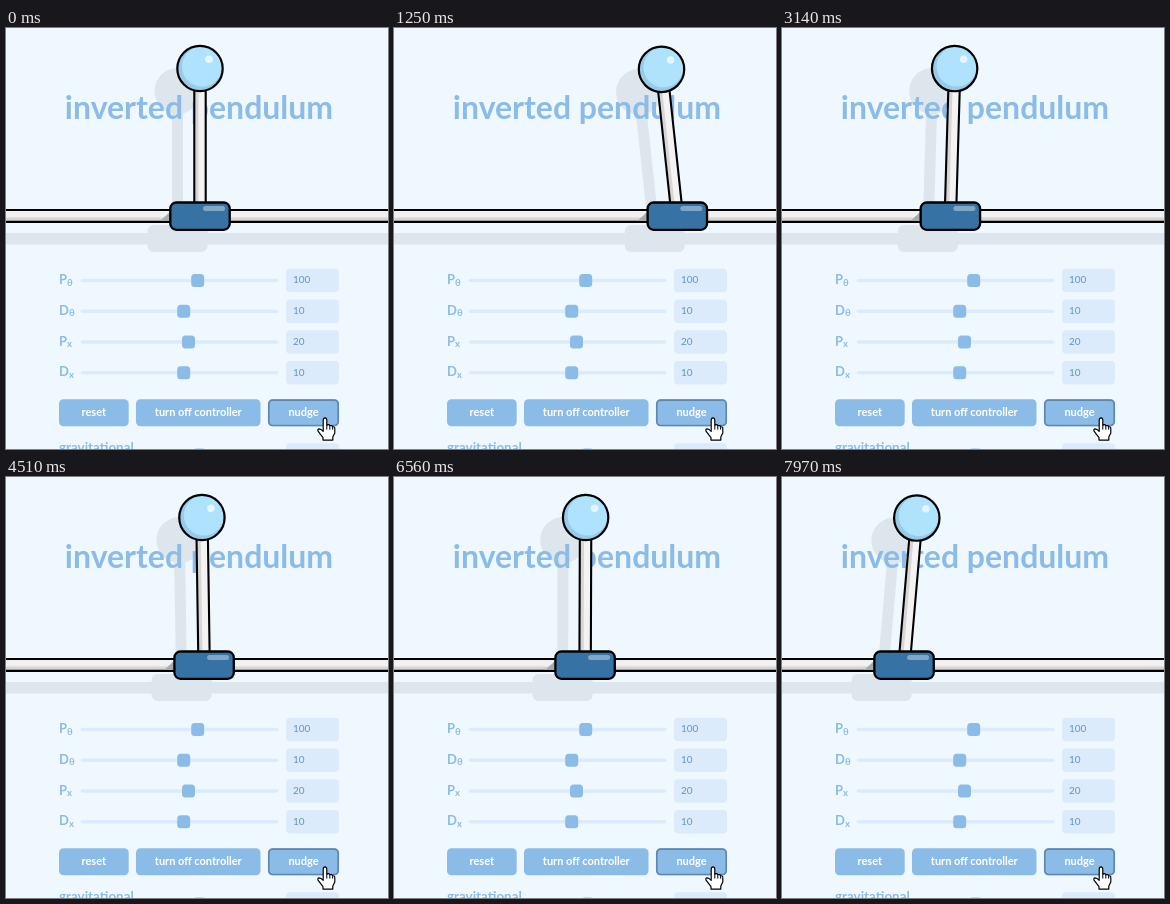
Animation, 382 px wide and 421 px high, one loop 7.99 s. Source, as an HTML page:

```html
<!DOCTYPE html>
<html lang="en">
<head>
<meta charset="utf-8">
<title>Inverted pendulum</title>
<style>
  html, body { margin: 0; width: 100%; height: 100%; overflow: hidden; background: #eff8ff; }
  svg { display: block; width: 382px; height: 421px; font-family: Lato, "Noto Sans", sans-serif; }
  .blue { fill: #8bbce7; }
  .pale { fill: #dcebfb; }
  .bold { font-weight: 700; }
  .value { font-size: 10px; fill: #5f93c4; }
  .button { font-size: 11px; font-weight: 700; fill: #fff; text-anchor: middle; }
</style>
</head>
<body>
<svg viewBox="0 0 382 421">
  <rect width="382" height="421" fill="#eff8ff"/>

  <g fill="#dee6ed" transform="translate(-22.5 22.5)">
    <rect y="182.5" width="405" height="11.5"/>
    <g class="cart">
      <rect x="-30" y="174.5" width="60" height="27" rx="6"/>
      <g class="pole">
        <rect x="-5.5" y="-147" width="11" height="147"/>
        <circle cy="-147.5" r="23"/>
      </g>
    </g>
  </g>

  <text class="blue bold" x="193" y="91" font-size="32" text-anchor="middle">inverted pendulum</text>
  <g id="panel"></g>

  <rect x="-5" y="182" width="392" height="12" fill="#f0f0f0"/>
  <rect x="-5" y="189.5" width="392" height="4" fill="#d5d5d5"/>
  <path d="M0 182H382M0 193.8H382" stroke="#000" stroke-width="2.2"/>

  <g class="cart">
    <path d="M-29 183V193H-40Z" fill="#aaa"/>
    <g class="pole">
      <rect x="-5.6" y="-140" width="11.2" height="140" fill="#f3f3f3"/>
      <rect x="-5" y="-140" width="3.5" height="140" fill="#d6d6d6"/>
      <path d="M-5.7 -130V0M5.7 -130V0" stroke="#000" stroke-width="2.1"/>
    </g>
    <rect x="-29.7" y="174.5" width="59.4" height="27.3" rx="6" fill="#3672a4" stroke="#000" stroke-width="2.3"/>
    <rect x="3" y="178" width="22" height="5" rx="2.5" fill="#80a7c8"/>
  </g>
  <g id="ball">
    <circle r="22.7" fill="#98cbea"/>
    <circle cx="2" cy="-2" r="20" fill="#afe3fd"/>
    <circle r="22.7" fill="none" stroke="#000" stroke-width="2.2"/>
    <circle cx="9" cy="-9.3" r="3.8" fill="#e4f6ff"/>
  </g>

  <g stroke="#000" transform="translate(0 .6)">
    <path d="M317.2 402V391.7Q317.3 389.3 319 389.3T320.8 391.7V396.5Q323 395.3 323.8 397.2Q326 396.4 326.6 398.2Q329 397.8 328.8 400.5V404.5L326.8 408.5V411.5H317V409L312 402.5Q311.3 400.5 313.2 400.2Q315 400.2 317.2 402.8Z"
      fill="#fff" stroke-width="1.2" stroke-linejoin="round"/>
    <path d="M320.8 396.5V401M323.8 397.5V401M326.6 398.5V401"/>
  </g>
</svg>
<script>
const LOOP = 7990, STEP = 5, CENTER = 192.5, LENGTH = 147.5;
const panel = document.getElementById('panel');

function box(x, y, w, h, r, cls, extra = '') {
  return `<rect x="${x}" y="${y}" width="${w}" height="${h}" rx="${r}" class="${cls}" ${extra}/>`;
}

function slider(y, knob, value) {
  return box(74.5, y - 1.8, 198, 3.6, 1.8, 'pale') +
    box(knob - 6.5, y - 6.5, 13, 13, 3.5, 'blue') +
    box(280, y - 11.8, 53, 23.6, 4, 'pale') +
    `<text class="value" x="287" y="${y + 2.9}">${value}</text>`;
}

const rows = [
  ['P', 'θ', 252.5, 191.7, 100],
  ['D', 'θ', 283.3, 177.7, 10],
  ['P', 'x', 314, 182.5, 20],
  ['D', 'x', 344.7, 177.7, 10]
];
const buttons = [['reset', 53, 69.7], ['turn off controller', 130, 124.5], ['nudge', 262, 71]];

panel.innerHTML =
  rows.map(([name, sub, y, knob, value]) => slider(y, knob, value) +
    `<text class="blue bold" x="53" y="${y + 3.5}" font-size="13">${name}<tspan font-size="9.5" dy="1.5">${sub}</tspan></text>`
  ).join('') +
  buttons.map(([label, x, w]) => box(x, 371.3, w, 27, 4.5, 'blue') +
    `<text class="button" x="${x + w / 2}" y="388">${label}</text>`
  ).join('') +
  box(262.8, 372.1, 69.4, 25.4, 4, '', 'id="focus" fill="#000" fill-opacity="0" stroke="#5f87ad" stroke-width="1.7"') +
  slider(427, 193.5, '') +
  '<text class="blue bold" x="53" y="423.7" font-size="13.4">gravitational</text>';

// Linear cart-pole: feedback gains on lean and position, kicked at each nudge.
const GRAVITY = 9.8;
const GAIN = { lean: 149.3, leanRate: 22.2, pos: 29.6, posRate: 15.8 };
const nudges = [{ at: 175, kick: 207 }, { at: 6915, kick: -156 }];

function simulate() {
  const states = [];
  const dt = 0.001;
  let cart = 1.5, cartV = 0, ball = 1.5, ballV = 0;
  for (let ms = 0; ms <= LOOP; ms++) {
    for (const n of nudges) if (ms === n.at) ballV += n.kick;
    const lean = ball - cart;
    if (ms % STEP === 0) states.push([cart, lean]);
    const accel = GAIN.lean * lean + GAIN.leanRate * (ballV - cartV) +
      GAIN.pos * cart + GAIN.posRate * cartV;
    cartV += accel * dt;
    ballV += GRAVITY * lean * dt;
    cart += cartV * dt;
    ball += ballV * dt;
  }
  return states;
}

const states = simulate();
const carts = document.querySelectorAll('.cart');
const poles = document.querySelectorAll('.pole');
const bob = document.getElementById('ball');
const focus = document.getElementById('focus');

function draw(t) {
  const [offset, lean] = states[Math.floor(t / STEP)];
  const x = CENTER + offset;
  const angle = Math.asin(lean / LENGTH);
  carts.forEach(el => el.setAttribute('transform', `translate(${x} 0)`));
  poles.forEach(el => el.setAttribute('transform', `translate(0 188) rotate(${angle * 180 / Math.PI})`));
  bob.setAttribute('transform', `translate(${x + lean} ${188 - LENGTH * Math.cos(angle)})`);
  const pressed = nudges.some(n => t >= n.at - 100 && t < n.at);
  focus.setAttribute('fill-opacity', pressed ? 0.08 : 0);
}

function tick(now) {
  draw(now % LOOP);
  requestAnimationFrame(tick);
}

draw(0);
requestAnimationFrame(tick);
</script>
</body>
</html>
```
